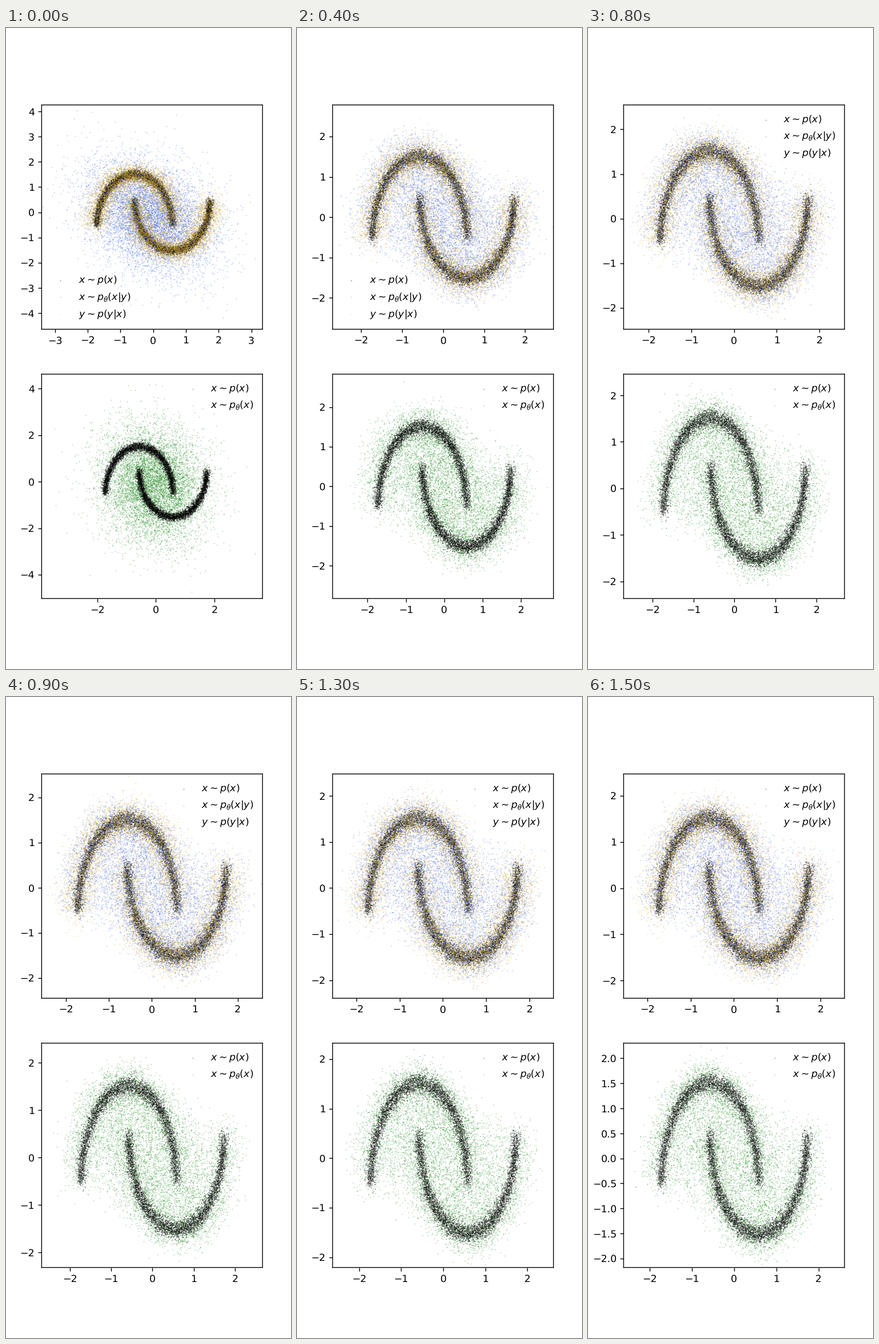
Recreate the animation shown at these times as a matplotlib script. Size 499 by 1122 pixels, loop 1600 ms.

```python
import numpy as np
import matplotlib.pyplot as plt
from matplotlib.animation import FuncAnimation

WIDTH, HEIGHT, DPI = 499, 1122, 125
FRAMES, INTERVAL = 16, 100
POINTS = 8192

plt.rcParams.update({"path.snap": False, "text.hinting": "none"})


def decay(i, rate=0.46):
    """Fast, then slowing approach from 1 towards 0."""
    return np.exp(-rate * i ** 0.82)


def moons(rng, noise=0.05):
    """Two interleaved half circles, scaled to zero mean and unit variance."""
    t = rng.uniform(0, np.pi, POINTS)
    upper = rng.random(POINTS) < 0.5
    x = np.where(upper, np.cos(t), 1 - np.cos(t))
    y = np.where(upper, np.sin(t), 0.5 - np.sin(t))
    pts = np.column_stack([x, y]) + noise * rng.standard_normal((POINTS, 2))
    return (pts - [0.5, 0.25]) / [0.8675, 0.4967]


def gaussian(rng, sd_x, sd_y, corr):
    cross = corr * sd_x * sd_y
    cov = [[sd_x ** 2, cross], [cross, sd_y ** 2]]
    return rng.multivariate_normal((-0.1, -0.15), cov, POINTS)


def blend(rng, spread):
    """Noisy mixtures of moon points, filling the space between the arcs."""
    w = rng.beta(0.7, 0.7, (POINTS, 1))
    pts = w * moons(rng, 0) + (1 - w) * moons(rng, 0)
    return 1.1 * pts + spread * rng.standard_normal((POINTS, 2))


def model_samples(i, seed, sd_x, sd_y, corr):
    rng = np.random.default_rng([seed, i])
    if i == 0:
        return gaussian(rng, sd_x, sd_y, corr)
    return blend(rng, 0.18 + 0.35 * decay(i))


def cloud(ax, pts, color, label, alpha=0.4, zorder=1):
    return ax.scatter(pts[:, 0], pts[:, 1], s=1, c=color, alpha=alpha,
                      linewidths=0, label=label, zorder=zorder)


def zoom(ax, start, end, amount):
    """Set (xmin, xmax, ymin, ymax) between end (0) and start (1)."""
    start, end = np.array(start), np.array(end)
    x0, x1, y0, y1 = end + (start - end) * amount
    ax.set_xlim(x0, x1)
    ax.set_ylim(y0, y1)


rng = np.random.default_rng(7)
data = moons(rng)
noisy = data + 0.21 * rng.standard_normal((POINTS, 2))

fig, (top, bottom) = plt.subplots(
    2, 1, figsize=(WIDTH / DPI, HEIGHT / DPI), dpi=DPI)

cloud(top, data, "black", r"$x \sim p(x)$", alpha=0.5)
posterior = cloud(top, data, "royalblue", r"$x \sim p_\theta(x|y)$")
cloud(top, noisy, "goldenrod", r"$y \sim p(y|x)$", alpha=0.37)
top_legend = top.legend(loc="lower left", frameon=False)

cloud(bottom, data, "black", r"$x \sim p(x)$", alpha=0.45, zorder=1.5)
prior = cloud(bottom, data, "forestgreen", r"$x \sim p_\theta(x)$")
bottom.legend(loc="upper right", frameon=False)


def update(i):
    posterior.set_offsets(model_samples(i, 1, 0.95, 1.12, -0.3))
    prior.set_offsets(model_samples(i, 2, 0.88, 1.22, -0.1))
    zoom(top, (-3.41, 3.34, -4.64, 4.26), (-2.54, 2.55, -2.37, 2.46),
         decay(i, 0.55))
    zoom(bottom, (-3.89, 3.63, -5.02, 4.62), (-2.60, 2.60, -2.14, 2.27),
         decay(i))
    top_legend.set_loc("lower left" if i < 6 else "upper right")
    return posterior, prior


anim = FuncAnimation(fig, update, frames=FRAMES, interval=INTERVAL,
                     repeat=True, repeat_delay=0, blit=False)
plt.show()
```
